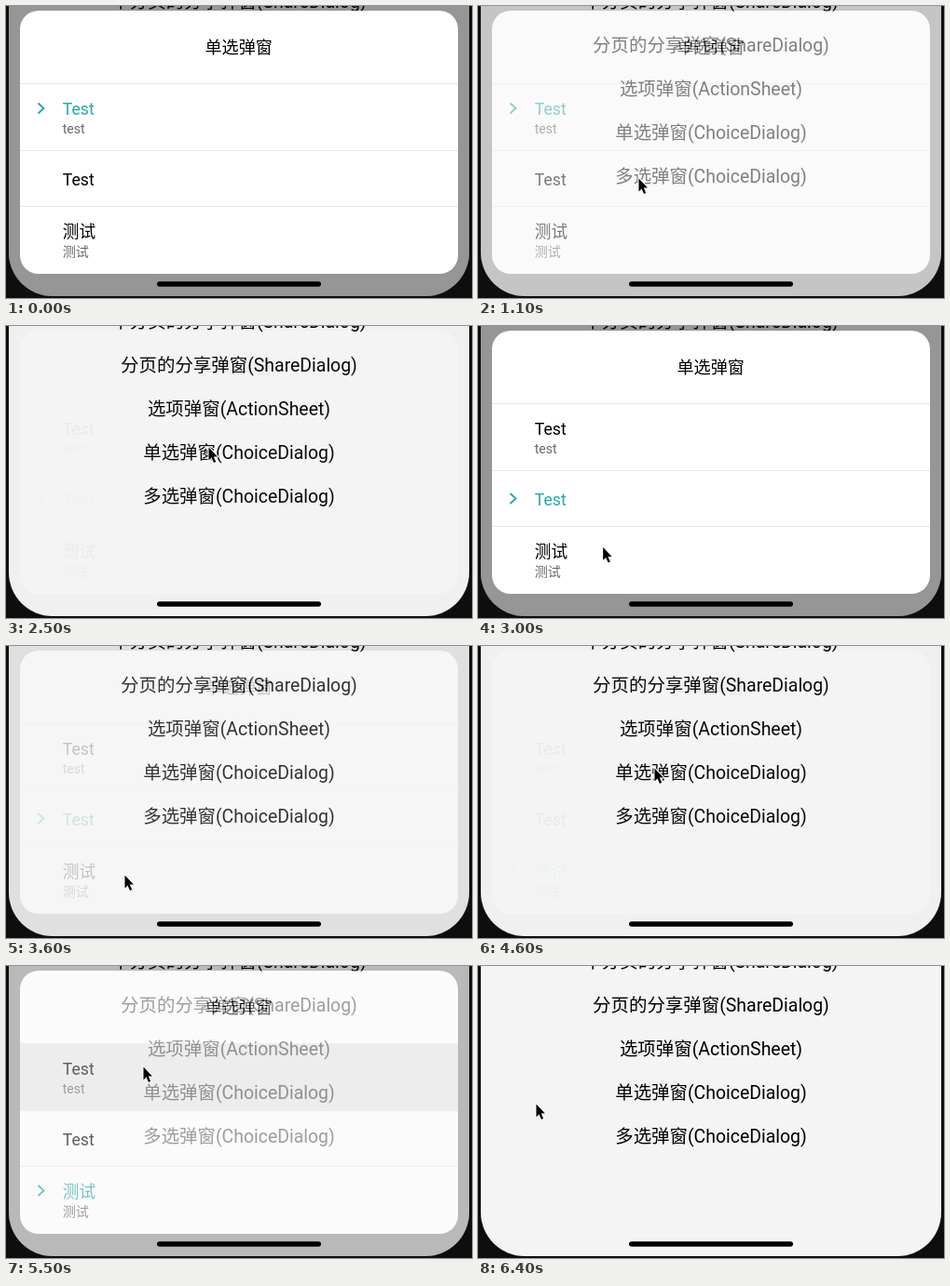
These frames come from a looping animation (500x314 px, 7.3 s). An HTML page:

```html
<!DOCTYPE html>
<html lang="zh-CN">
<head>
<meta charset="utf-8">
<title>单选弹窗</title>
<style>
  html, body { margin: 0; width: 100%; height: 100%; overflow: hidden; background: #0e0e0e; }
  svg { display: block; width: 100vw; height: 100vh; }
  text { font-family: Roboto, "Noto Sans CJK SC", "Noto Sans CJK", sans-serif; white-space: pre; }
  .page text { font-size: 19.45px; text-anchor: middle; fill: #000; }
  .title { font-size: 18.1px; font-weight: 500; text-anchor: middle; fill: #000; }
  .name { font-size: 17.7px; fill: #000; }
  .note { font-size: 14.1px; fill: #686868; }
  .name.on { fill: #22aaa5; }
  .rule { stroke: #e8e8e8; }
</style>
</head>
<body>
<svg viewBox="0 0 500 314">
  <defs>
    <clipPath id="screen"><rect x="3" y="-60" width="494" height="372" rx="47"/></clipPath>
    <clipPath id="card"><rect x="15" y="5" width="470" height="283" rx="20"/></clipPath>
  </defs>
  <rect width="500" height="314" fill="#0e0e0e"/>
  <g clip-path="url(#screen)">
    <rect width="500" height="314" fill="#f4f4f4"/>
    <g class="page" id="page"></g>
    <g id="overlay">
      <rect width="500" height="314" opacity=".39"/>
      <g clip-path="url(#card)">
        <rect width="500" height="314" fill="#fff"/>
        <rect id="press" y="84" width="500" height="72" fill="#e9e9e9"/>
        <path class="rule" d="M15 83.5H485M15 155.5H485M15 215.5H485"/>
        <text class="title" x="249.7" y="51">单选弹窗</text>
        <g id="options"></g>
        <path id="chevron" d="M34.5 -6L40.5 -.5L34.5 5" fill="none" stroke="#22aaa5" stroke-width="1.9"/>
      </g>
    </g>
    <rect x="162" y="296.2" width="176" height="5.6" rx="2.8"/>
  </g>
  <path id="cursor" d="M.5 .5V14.4L3.5 11.5L6 17L8.2 16L5.8 10.5H10Z"
        stroke="#fff" stroke-width="2" stroke-linejoin="round" paint-order="stroke"/>
</svg>
<script>
const LOOP = 7300, STEP = 100;
const OPEN_MS = 500, CLOSE_MS = 400, PRESS_AT = 5300, CURSOR_AT = 200;
const $ = id => document.getElementById(id);

function addText(parent, str, x, y, cls = '') {
  const el = document.createElementNS('http://www.w3.org/2000/svg', 'text');
  el.setAttribute('x', x);
  el.setAttribute('y', y);
  el.setAttribute('class', cls);
  el.textContent = str;
  return parent.appendChild(el);
}

['不分页的分享弹窗(ShareDialog)', '分页的分享弹窗(ShareDialog)', '选项弹窗(ActionSheet)',
 '单选弹窗(ChoiceDialog)', '多选弹窗(ChoiceDialog)']
  .forEach((s, i) => addText($('page'), s, 250, 2.2 + 47 * i));

// Each option is selected while its dialog opens and closes.
const options = [
  { name: 'Test', note: 'test', mid: 110.5, open: -OPEN_MS, close: 900 },
  { name: 'Test', note: '', mid: 186, open: 2440, close: 3315 },
  { name: '测试', note: '测试', mid: 242, open: 4540, close: 5332 }
];
for (const o of options) {
  o.el = addText($('options'), o.name, 60.7, o.mid + 6.5, 'name');
  addText($('options'), o.note, 60.7, o.mid + 26.8, 'note');
}

const moves = [
  { from: 200, to: 800, x: 172, y: 185 },
  { from: 1300, to: 1700, x: 268, y: 108 },
  { from: 1800, to: 2200, x: 217, y: 130 },
  { from: 2500, to: 3100, x: 127, y: 246 },
  { from: 3800, to: 4500, x: 189, y: 131 },
  { from: 4700, to: 5100, x: 147, y: 108 },
  { from: 5500, to: 5900, x: 88, y: 148 },
  { from: 6300, to: 6400, x: 62, y: 148 }
];

function ease(t, from, to) {
  const p = Math.min(1, Math.max(0, (t - from) / (to - from)));
  return p * p * (3 - 2 * p);
}

function cursorAt(t) {
  let x = 62, y = 106;
  for (const m of moves) {
    const p = ease(t, m.from, m.to);
    x += (m.x - x) * p;
    y += (m.y - y) * p;
  }
  return `translate(${x} ${y})`;
}

function draw(t) {
  const picked = options.filter(o => t >= o.open).pop();
  for (const o of options) o.el.classList.toggle('on', o === picked);
  const shown = ease(t, picked.open, picked.open + OPEN_MS) - ease(t, picked.close, picked.close + CLOSE_MS);
  $('overlay').setAttribute('opacity', shown);
  $('chevron').setAttribute('transform', `translate(0 ${picked.mid})`);
  $('press').setAttribute('opacity', +(t >= PRESS_AT));
  $('cursor').setAttribute('transform', cursorAt(t));
  $('cursor').setAttribute('opacity', +(t >= CURSOR_AT));
}

const start = performance.now();
function tick() {
  const t = (performance.now() - start) % LOOP;
  draw(Math.floor(t / STEP) * STEP);
  requestAnimationFrame(tick);
}
tick();
</script>
</body>
</html>
```
